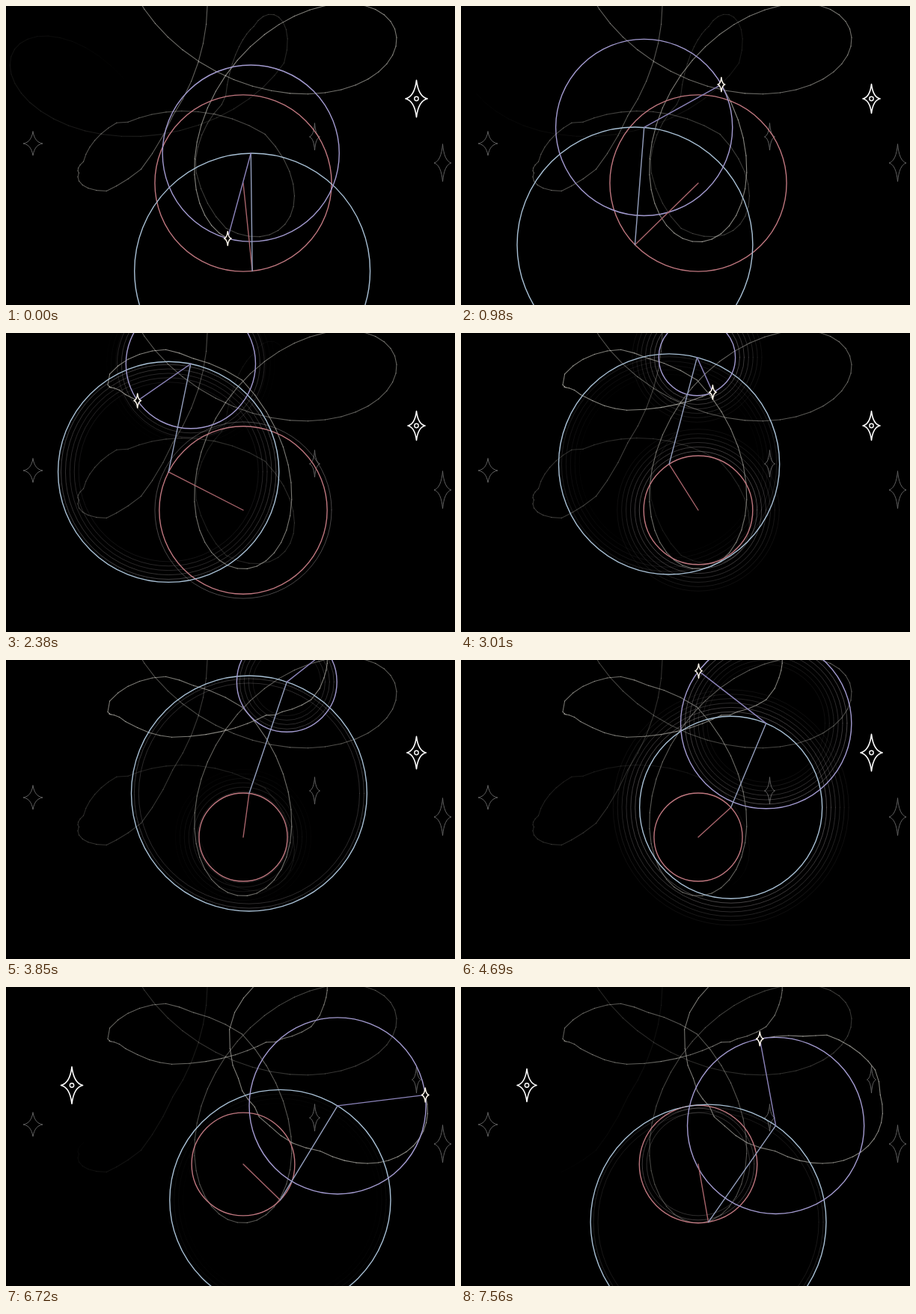
These frames come from a looping animation (600x400 px, 7630 ms). An HTML page with a canvas:

```html
<!DOCTYPE html>
<html lang="en">
<head>
<meta charset="utf-8">
<title>Epicycles</title>
<style>
html, body { margin: 0; width: 100%; height: 100%; overflow: hidden; background: #000; }
canvas { display: block; }
</style>
</head>
<body>
<canvas id="stage" width="600" height="400"></canvas>
<script>
const ctx = document.getElementById('stage').getContext('2d');
const STEP = 70, COUNT = 109, FIRST = -184, UNIT = 0.984, LIFE = 632;
const CENTER = [317, 237];

// Each arm: angle at step 0, speed relative to the first arm, earliest radius,
// and the steps at which it heads for a new radius.
const arms = [
  { angle: 84.1, speed: 1, radius: 120, color: '#bf777f', line: '#a8646b',
    goals: { 34: 110, 38: 60, 77: 70, 104: 80 } },
  { angle: -90.7, speed: 0.1, radius: 120, color: '#a9c1d6', line: '#949fbd',
    goals: { '-128': 160, '-93': 124, '-77': 160, 21: 158, 22: 100, 28: 150, 50: 160, 62: 102, 74: 150, 97: 160 } },
  { angle: 105.2, speed: -2.6, radius: 120, color: '#a39bd0', line: '#8c84ba',
    goals: { '-147': 60, '-127': 120, '-103': 66, '-83': 120,
      17: 100, 27: 88, 38: 46, 47: 68, 60: 120, 70: 100, 76: 120 } }
];

// Radii approach their goal by at most 6 units per step.
for (const arm of arms) {
  let r = arm.radius, goal = r;
  arm.radii = [];
  for (let k = FIRST; k < COUNT; k++) {
    goal = arm.goals[k] ?? goal;
    r += Math.max(-6, Math.min(6, goal - r));
    arm.radii.push(r);
  }
}
const radius = (arm, k) => arm.radii[k - FIRST] * UNIT;

// Degrees turned by the first arm: key points as [step, degrees].
const turns = [[FIRST, FIRST * 3.5], [0, 0], [26, 95.9], [43, 153.6], [67, 233.6], [82, 279.6], [96, 320.1], [108, 356]];
function turnAt(k) {
  const i = turns.findIndex(([at], n) => n > 0 && at >= k);
  const [k0, a] = turns[i - 1], [k1, b] = turns[i];
  return a + (b - a) * (k - k0) / (k1 - k0);
}

function joints(k) {
  const turn = turnAt(k), points = [CENTER];
  let [x, y] = CENTER;
  for (const arm of arms) {
    const a = (arm.angle + arm.speed * turn) * Math.PI / 180, r = radius(arm, k);
    x += r * Math.cos(a);
    y += r * Math.sin(a);
    points.push([x, y]);
  }
  return points;
}

const trail = [];
for (let k = FIRST; k < COUNT; k++) trail.push({ turn: turnAt(k), tip: joints(k)[3] });

function stroke(color, width, alpha = 1) {
  ctx.globalAlpha = alpha;
  ctx.strokeStyle = color;
  ctx.lineWidth = width;
  ctx.stroke();
}

function circle([x, y], r, ...style) {
  ctx.beginPath();
  ctx.arc(x, y, r, 0, 2 * Math.PI);
  stroke(...style);
}

function segment(from, to, ...style) {
  ctx.beginPath();
  ctx.moveTo(...from);
  ctx.lineTo(...to);
  stroke(...style);
}

function star(x, y, w, h, color, width, filled) {
  ctx.beginPath();
  ctx.moveTo(x, y - h);
  for (const [sx, sy, down] of [[1, -1, 1], [1, 1, 0], [-1, 1, 1], [-1, -1, 0]]) {
    const tall = [x + sx * w * 0.12, y + sy * h * 0.42];
    const wide = [x + sx * w * 0.42, y + sy * h * 0.08];
    if (down) ctx.bezierCurveTo(...tall, ...wide, x + sx * w, y);
    else ctx.bezierCurveTo(...wide, ...tall, x, y + sy * h);
  }
  ctx.closePath();
  ctx.globalAlpha = 1;
  ctx.fillStyle = '#000';
  if (filled) ctx.fill();
  stroke(color, width);
}

function drawTrail(k) {
  const now = turnAt(k);
  for (let i = 1; i <= k - FIRST; i++) {
    const from = trail[i - 1], to = trail[i];
    const fade = 1 - (now - from.turn) / LIFE;
    if (fade > 0) segment(from.tip, to.tip, '#e2e0d6', 1.1, 0.6 * fade ** 0.75);
  }
}

// The last radii linger as thin fading rings.
function drawRings(arm, center, k) {
  let n = 0;
  for (let j = k; j > k - 18 && n < 6; j--) {
    const r = radius(arm, j - 1);
    if (r === radius(arm, j)) continue;
    circle(center, r, '#a09a9c', 0.9, 0.5 * (1 - n / 7) * (1 - (k - j) / 18));
    n++;
  }
}

function drawStars(k) {
  const dim = '#606060', moved = k >= 91;
  star(36, 184, 13, 16, dim, 1);
  star(412.5, 175, 7, 18, dim, 1);
  star(583.5, 210, 11.5, 25, dim, 1);
  if (moved) star(548.5, 124, 6, 18, dim, 1);
  const [x, y] = moved ? [88, 131.5] : [548.5, 124];
  const size = 1 + 0.12 * Math.cos(2 * Math.PI * k / 9.6);
  star(x, y, 13 * size, 22 * size, '#fff', 1.6);
  circle([x, y], 2.7, '#fff', 1.4);
}

function draw(k) {
  const points = joints(k);
  ctx.globalAlpha = 1;
  ctx.fillStyle = '#000';
  ctx.fillRect(0, 0, 600, 400);
  ctx.lineCap = ctx.lineJoin = 'round';
  drawStars(k);
  drawTrail(k);
  arms.forEach((arm, i) => {
    drawRings(arm, points[i], k);
    circle(points[i], radius(arm, k), arm.color, 1.4);
  });
  arms.forEach((arm, i) => segment(points[i], points[i + 1], arm.line, 1.4));
  star(...points[3], 4.8, 9.5, '#fff8ec', 1.5, true);
}

const start = performance.now();
function tick() {
  draw(Math.floor((performance.now() - start) / STEP) % COUNT);
  requestAnimationFrame(tick);
}
tick();
</script>
</body>
</html>
```
